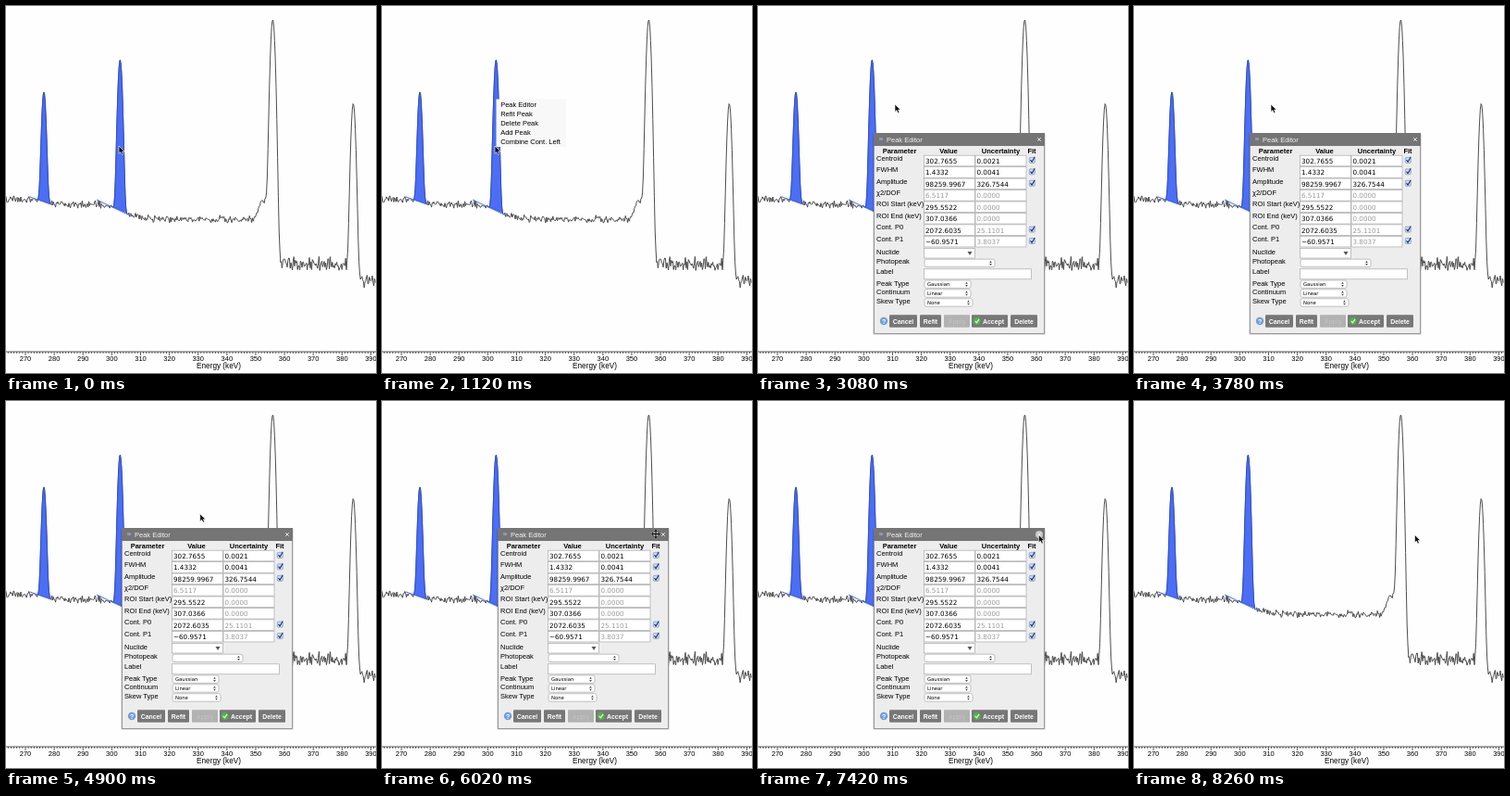
An HTML page for the animation above (8400 ms loop, 400 px wide and 396 px high).

```html
<!DOCTYPE html>
<html lang="en">
<head>
<meta charset="utf-8">
<title>Peak editor</title>
<style>
html, body { margin: 0; width: 100%; height: 100%; overflow: hidden; background: #fefefe; }
svg { display: block; width: 400px; height: 396px; }
text { font: 7.5px "Liberation Sans", Arial, sans-serif; fill: #000; white-space: pre; }
text.mid { text-anchor: middle; }
text.bold { font-weight: bold; }
text.num { font: 7.2px "DejaVu Sans", sans-serif; }
text.pick { font: 5.3px "DejaVu Sans", sans-serif; }
text.btn { font-size: 6.9px; font-weight: bold; fill: #fff; text-anchor: middle; }
</style>
</head>
<body>
<svg id="stage" viewBox="0 0 400 396">
  <g id="plot"></g>
  <g id="menu"></g>
  <g id="dialog"></g>
  <g id="arrow"><path d="M0 0V8.3L1.9 6.6L3.3 9.4L4.9 8.7L3.6 6H6.1Z" fill="#111" stroke="#fff" stroke-width=".6"/></g>
  <g id="mover">
    <path d="M-4.5 0H4.5M0 -4.5V4.5" stroke="#fff" stroke-width="2.6"/>
    <path d="M-4 0H4M0 -4V4" stroke="#111" stroke-width="1.3"/>
    <path d="M0 -5L2 -2.8H-2ZM0 5L2 2.8H-2ZM-5 0L-2.8 2V-2ZM5 0L2.8 2V-2Z" fill="#111"/>
  </g>
</svg>
<script>
const $ = id => document.getElementById(id);
const [plot, menu, dialog, arrow, mover] = ['plot', 'menu', 'dialog', 'arrow', 'mover'].map($);

function add(parent, tag, attrs, label) {
  const el = document.createElementNS('http://www.w3.org/2000/svg', tag);
  for (const k in attrs) el.setAttribute(k, attrs[k]);
  if (label !== undefined) el.textContent = label;
  parent.append(el);
  return el;
}
const rect = (p, x, y, width, height, fill, more) => add(p, 'rect', { x, y, width, height, fill, ...more });
const path = (p, d, stroke, width = 1, fill = 'none') =>
  add(p, 'path', { d, stroke, fill, 'stroke-width': width, 'stroke-linejoin': 'round' });
const text = (p, x, y, s, cls = '', style = '') => add(p, 'text', { x, y, class: cls, style }, s);
const show = (el, on) => { el.style.display = on ? '' : 'none'; };

// Linear interpolation through [position, value] pairs
function lerp(points, x) {
  const i = points.findIndex(p => p[0] > x);
  if (i === 0) return points[0][1];
  if (i < 0) return points[points.length - 1][1];
  const [x0, y0] = points[i - 1], [x1, y1] = points[i];
  return y0 + (y1 - y0) * (x - x0) / (x1 - x0);
}

let seed = 41;
const random = () => (seed = (seed * 16807) % 2147483647) / 2147483647;

const floorLine = [[0, 208], [30, 209], [52, 214], [100, 214], [116, 217], [128, 225], [137, 226],
  [160, 230], [228, 231], [234, 227], [240, 231], [268, 230], [271, 226], [275, 212], [281, 210],
  [283, 211], [297, 275], [303, 279], [366, 279], [385, 297], [400, 297]];
// centre, height, sigma
const peaks = [[41, 118.5, 1.85], [123.4, 163, 1.9], [288.8, 222, 1.97], [375.5, 182.5, 1.95]];
const LOG = 44; // pixels per e-fold of counts

// A Gaussian on a flat continuum, seen on a logarithmic scale
const bell = (x, [c, h, s]) =>
  LOG * Math.log(1 + (Math.exp(h / LOG) - 1) * Math.exp(-((x - c) ** 2) / (2 * s * s)));

function drawPlot() {
  let d = '';
  for (let x = 0; x <= 400; x += 0.8) {
    const lift = peaks.reduce((sum, p) => sum + bell(x, p), 0);
    const size = (x < 290 ? 4.4 : 9) / (1 + lift / 6);
    const y = lerp(floorLine, x) - lift + (random() + random() - 1) * size;
    d += (d ? 'L' : 'M') + x.toFixed(1) + ' ' + y.toFixed(1);
  }
  path(plot, d, '#444', 0.95);

  const fits = [[26, 206, 50, 214.5], [98, 209, 135, 226.5]];
  fits.forEach(([x0, y0, x1, y1], i) => {
    const [c, , s] = peaks[i];
    const ground = x => y0 + (y1 - y0) * (x - x0) / (x1 - x0);
    let fill = '';
    for (let x = c - 4 * s; x <= c + 4 * s; x += 0.4)
      fill += (fill ? 'L' : 'M') + x + ' ' + (ground(x) - bell(x, peaks[i]));
    path(plot, fill + 'Z', '#2b4ccc', 0.9, '#4b6ef5');
    path(plot, `M${x0} ${y0}L${x1} ${y1}`, '#4b6ef5', 1);
  });

  let ticks = 'M0 373H400';
  for (let e = 264; e <= 392; e++) {
    const x = 21 + (e - 270) * 3.112;
    ticks += `M${x} 373v${e % 10 ? 2 : 4}`;
    if (e % 10 === 0) text(plot, x, 382.7, e, 'mid');
  }
  path(plot, ticks, '#333', 0.8);
  text(plot, 230, 390.7, 'Energy (keV)', 'mid', 'font-size:8.2px');
}

const items = ['Peak Editor', 'Refit Peak', 'Delete Peak', 'Add Peak', 'Combine Cont. Left'];
let rows;
function drawMenu() {
  rect(menu, 123.5, 100.5, 75.5, 51.5, '#f8f8f8');
  rows = items.map((s, i) => ({
    bar: rect(menu, 123.3, 101.4 + i * 10, 73.7, 9.8, '#0b12e6'),
    label: text(menu, 128.2, 108.9 + i * 10, s)
  }));
}

function drawPicker(y, w, s) {
  rect(dialog, 180, y, w, 8.4, '#fff', { rx: 2, stroke: '#aaa', 'stroke-width': .7 });
  text(dialog, 183, y + 6.1, s, 'pick');
  const x = 180 + w - 4.5;
  path(dialog, `M${x - 1.3} ${y + 3.7}l1.3 -2l1.3 2ZM${x - 1.3} ${y + 4.9}l1.3 2l1.3 -2Z`, 'none', 0, '#444');
}

let halo;
function drawDialog() {
  rect(dialog, 124, 137, 187, 218, '#000', { opacity: .12, rx: 2 });
  rect(dialog, 125.5, 137.5, 184, 216, '#ededed', { stroke: '#999' });
  rect(dialog, 125, 137, 185, 14, '#757575');
  rect(dialog, 131, 142, 4, 3, '#8799b8');
  text(dialog, 139, 147, 'Peak Editor', '', 'fill:#f2f2f2');
  halo = add(dialog, 'circle', { cx: 304, cy: 144, r: 4, fill: '#c8c8c8' });
  path(dialog, 'M302.3 142.3l3.4 3.4m0 -3.4l-3.4 3.4', '#eee', 1);

  [[153, 'Parameter'], [206, 'Value'], [262.5, 'Uncertainty'], [296, 'Fit']]
    .forEach(([x, s]) => text(dialog, x, 159, s, 'mid bold'));

  // label, value, uncertainty, has check box, value is grey, uncertainty is grey
  const fields = [
    ['Centroid', '302.7655', '0.0021', 1, 0, 0],
    ['FWHM', '1.4332', '0.0041', 1, 0, 0],
    ['Amplitude', '98259.9967', '326.7544', 1, 0, 0],
    ['χ2/DOF', '6.5117', '0.0000', 0, 1, 1],
    ['ROI Start (keV)', '295.5522', '0.0000', 0, 0, 1],
    ['ROI End (keV)', '307.0366', '0.0000', 0, 0, 1],
    ['Cont. P0', '2072.6035', '25.1101', 1, 0, 1],
    ['Cont. P1', '−60.9571', '3.8037', 1, 0, 1]
  ];
  fields.forEach(([name, value, error, check, dim, dimError], i) => {
    const y = 161.2 + i * 12.45;
    text(dialog, 128, y + 5.4, name);
    [[179.5, value, dim], [235, error, dimError]].forEach(([x, s, grey]) => {
      rect(dialog, x, y, 55, 11.6, '#fff', { stroke: '#aaa', 'stroke-width': .7 });
      text(dialog, x + 1.5, y + 8.6, s, 'num', grey ? 'fill:#999' : '');
    });
    if (check) {
      rect(dialog, 293.3, y + 2.2, 6, 6, '#c9dcf5', { rx: 1, stroke: '#7d94b8', 'stroke-width': .7 });
      path(dialog, `M294.5 ${y + 5}l1.6 2l3.2 -5.4`, '#1b3270', 1.1);
    }
  });

  [[267.5, 'Nuclide'], [277.5, 'Photopeak'], [288.5, 'Label'], [301.5, 'Peak Type'],
    [311, 'Continuum'], [320.8, 'Skew Type']].forEach(([y, s]) => text(dialog, 128, y, s));
  rect(dialog, 179.5, 261.5, 55, 10.5, '#fff', { stroke: '#aaa', 'stroke-width': .7 });
  path(dialog, 'M226.5 265h5l-2.5 4Z', 'none', 0, '#555');
  drawPicker(273.2, 76, '');
  rect(dialog, 179.5, 283.8, 116, 11, '#fff', { stroke: '#aaa', 'stroke-width': .7 });
  drawPicker(296, 50, 'Gaussian');
  drawPicker(305.8, 50, 'Linear');
  drawPicker(315.8, 52, 'None');

  add(dialog, 'circle', { cx: 136, cy: 340, r: 4.2, fill: '#6f9fd8' });
  text(dialog, 136, 342.5, '?', 'btn');
  [[142, 30, 'Cancel', 157], [175, 23, 'Refit', 186.5], [201, 28, 'Apply', 215],
    [231, 39, 'Accept', 254.5], [273, 29, 'Delete', 287.5]].forEach(([x, w, s, mid]) => {
    const off = s === 'Apply';
    rect(dialog, x, 333.3, w, 13.5, off ? '#b2b2b2' : '#777', { rx: 1 });
    text(dialog, mid, 342.5, s, 'btn', off ? 'fill:#bebebe' : '');
  });
  add(dialog, 'circle', { cx: 236.8, cy: 340, r: 4, fill: '#4fb347' });
  path(dialog, 'M234.8 340l1.6 1.8l2.6 -3.8', '#fff', 1.1);
}

const LOOP = 8400, STEP = 140;
const MENU_ON = 840, DIALOG_ON = 2940, DIALOG_OFF = 7840;
// time, x, y of the pointer tip
const route = [[0, 122, 151], [1400, 122, 151], [2240, 148, 106], [4340, 148, 106],
  [5600, 296, 143.5], [6440, 296, 143.5], [6860, 303.5, 144.5], [LOOP, 303.5, 144.5]];

function pointer(t) {
  const i = Math.max(1, route.findIndex(p => p[0] > t));
  const [t0, x0, y0] = route[i - 1], [t1, x1, y1] = route[i];
  const u = (t - t0) / (t1 - t0), k = u * u * (3 - 2 * u);
  return [x0 + (x1 - x0) * k, y0 + (y1 - y0) * k];
}

function render(time) {
  const t = Math.floor(time % LOOP / STEP) * STEP;
  const [x, y] = pointer(t);
  const open = t >= DIALOG_ON && t < DIALOG_OFF;
  const onClose = x > 300;
  const moving = open && y > 138 && !onClose;

  show(menu, t >= MENU_ON && t < DIALOG_ON);
  rows.forEach(({ bar, label }, i) => {
    const hot = x > 123 && Math.floor((y - 101.4) / 10) === i;
    show(bar, hot);
    label.style.fill = hot ? '#fff' : '#000';
  });
  show(dialog, open);
  show(halo, onClose);
  show(arrow, !moving);
  show(mover, moving);
  (moving ? mover : arrow).setAttribute('transform', `translate(${x} ${y})`);
}

drawPlot();
drawMenu();
drawDialog();
const start = performance.now();
(function tick() {
  render(performance.now() - start);
  requestAnimationFrame(tick);
})();
</script>
</body>
</html>
```
